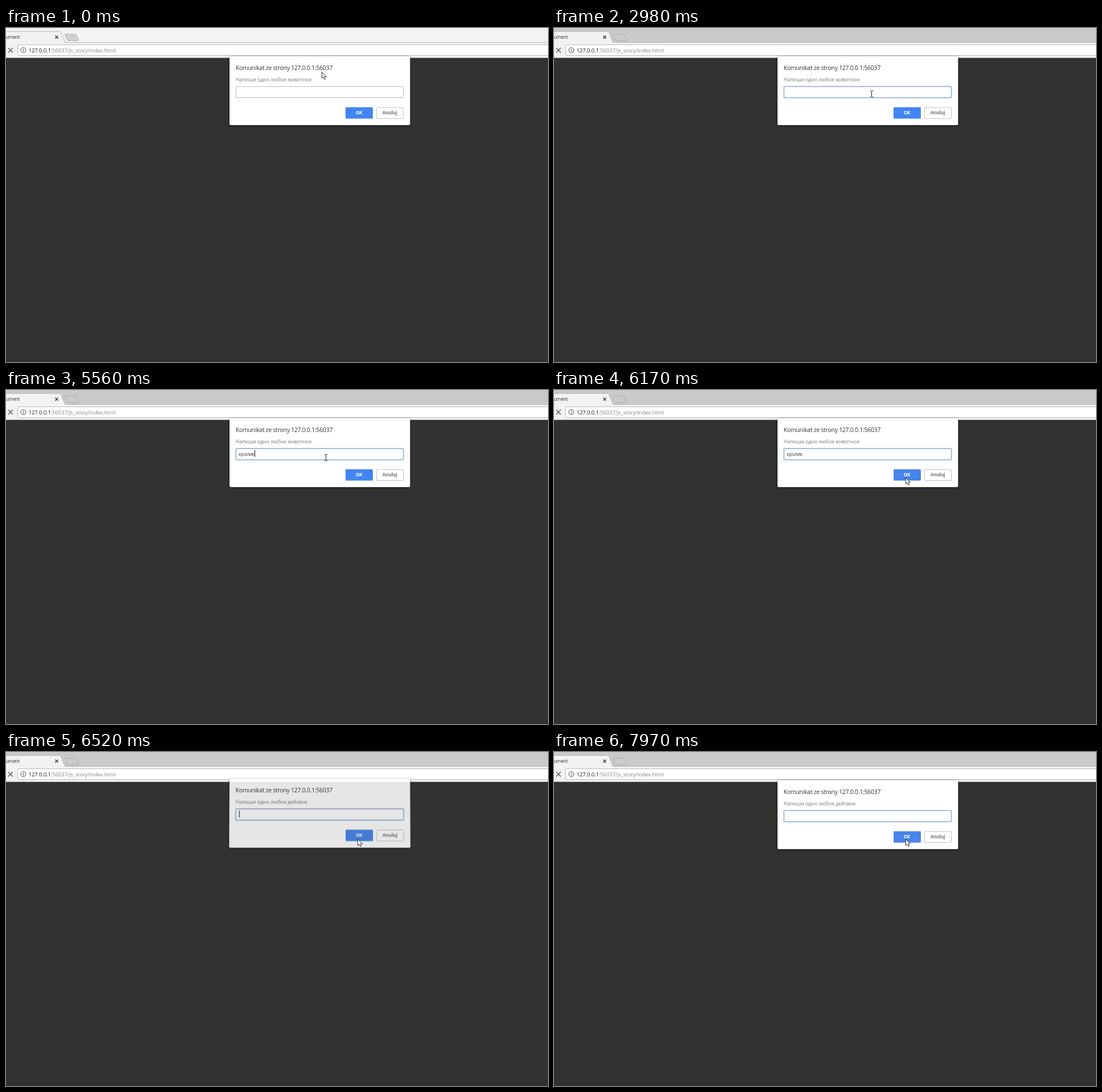
These frames come from a looping animation (953 by 588 pixels, 8000 ms). An HTML page:

```html
<!DOCTYPE html>
<html lang="pl">
<head>
<meta charset="utf-8">
<style>
  html, body { margin: 0; width: 100%; height: 100%; overflow: hidden; background: #323232; }
  svg { position: absolute; left: 0; top: 0; width: 953px; height: 588px; }
  text { font-family: "Open Sans", "Noto Sans", sans-serif; letter-spacing: -.022em; white-space: pre; }
  .dialog { left: 380px; width: 344px; height: 190px; transform-origin: 172px 50px; }
  .panel { fill: #fff; filter: drop-shadow(0 1px 2px rgba(0, 0, 0, .5)); }
  .button { font-size: 8.2px; font-weight: 700; text-anchor: middle; }
</style>
</head>
<body>
<svg viewBox="0 0 953 588">
  <rect id="strip" width="953" height="26"/>
  <path d="M104 25.5H953" stroke="#b4b4b4"/>
  <path id="newTab" d="M105 11H121.5Q123 11 123.7 12.5L127.5 20.5Q128 22.3 126 22.3H110Q108.3 22.3 107.5 20.5L103.8 12.5Q103.3 11 105 11Z" stroke="#a6a6a6" stroke-width=".9"/>
  <path d="M0 26V6H94.5Q96 6 96.8 7.8L103 23.5Q104 26 106 26H953V52.2H0Z" fill="#f2f2f2"/>
  <path d="M0 6H94.5Q96 6 96.8 7.8L103 23.5Q104 25.5 106 25.5" fill="none" stroke="#a8a8a8" stroke-width=".9"/>
  <path d="M0 52.5H953" stroke="#b3b3b3" stroke-width=".8"/>
  <rect x="20.5" y="29.5" width="950" height="19" rx="1.5" fill="#fff" stroke="#b9b9b9"/>
  <path d="M86.5 13.5L91.7 18.7M91.7 13.5L86.5 18.7" stroke="#333" stroke-width="1.3"/>
  <path d="M3.8 35L12 43.2M12 35L3.8 43.2" stroke="#555" stroke-width="1.3"/>
  <circle cx="30.5" cy="39" r="4.5" fill="none" stroke="#444"/>
  <path d="M30.5 38.3V41.6M30.5 36.3V37.4" stroke="#444" stroke-width="1.1"/>
  <text x="-.3" y="19.3" font-size="8.3" fill="#333">ument</text>
  <text x="39.7" y="42.6" font-size="9.7" fill="#888"><tspan fill="#222">127.0.0.1</tspan>:56037/js_story/index.html</text>
</svg>
<svg viewBox="0 0 953 588" style="z-index:1">
  <path id="arrow" d="M.5 .5V11.5L3 9.2L5 13.5L6.8 12.7L5 8.6H8.5Z" fill="#fff" stroke="#222" stroke-width=".9"/>
  <path id="beam" d="M-2.5 -5.5H-.8L.5 -4.5L1.8 -5.5H3.5M.5 -4.5V4.5M-2.5 5.5H-.8L.5 4.5L1.8 5.5H3.5" fill="none" stroke="#222"/>
</svg>
<script>
const LOOP = 8000, SWITCH = 6400;
const $ = id => document.getElementById(id);
const clamp = v => Math.max(0, Math.min(1, v));

// Cursor hotspot: time, x, y
const path = [
  [0, 555, 77], [139, 555, 77], [140, 555, 76], [630, 555, 76], [780, 555, 101], [900, 558, 117],
  [1349, 558, 117], [1350, 558, 116], [5149, 558, 116], [5150, 558, 115], [5500, 558, 115],
  [5860, 616, 162], [6040, 616, 162], [6130, 618, 154], [6299, 618, 154], [6300, 618, 153], [LOOP, 618, 153]
];
const keys = [[3450, "к"], [3680, "р"], [3740, "о"], [3970, "л"], [4270, "и"], [4490, "к"]];
const caretOn = [[410, 940], [1410, 1920], [2450, 2980], [3450, 5000], [5530, 6060], [SWITCH, 6880], [7410, 7970]];

function makeDialog(message) {
  document.body.insertAdjacentHTML("beforeend", `
    <svg class="dialog" viewBox="380 0 344 190">
      <path class="panel" d="M393 50H710.5V169Q710.5 171 708.5 171H395Q393 171 393 169Z"/>
      <text x="403.8" y="73.7" font-size="10.4" fill="#333">Komunikat ze strony 127.0.0.1:56037</text>
      <text x="403.8" y="93.7" font-size="9.1" fill="#7c7c7c">${message}</text>
      <rect class="field" x="404.3" y="103" width="294.5" height="19.7" rx="1.5" fill="#fff"/>
      <text class="typed" x="409.5" y="115.5" font-size="8.2" fill="#333"></text>
      <rect class="caret" y="106" width="1" height="12" fill="#111"/>
      <rect class="ok" x="597" y="139.5" width="48" height="20" rx="1.5"/>
      <text class="button" x="620.5" y="152.4" fill="#fff">OK</text>
      <rect x="651.3" y="140" width="47.5" height="19.3" rx="1.5" fill="#fff" stroke="#bdbdbd"/>
      <text class="button" x="674.7" y="152.4" fill="#757575">Anuluj</text>
    </svg>`);
  const root = document.body.lastElementChild;
  const part = name => root.querySelector("." + name);
  return { root, field: part("field"), typed: part("typed"), caret: part("caret"), ok: part("ok") };
}
const first = makeDialog("Напиши одно любое животное");
const second = makeDialog("Напиши одно любое дейсвие");

function drawDialog(d, { text, focused, caret, hover, lift, opacity }) {
  d.root.style.opacity = opacity;
  d.root.style.transform = lift
    ? `perspective(500px) translateY(${-lift}px) rotateX(${lift * .33}deg)` : "none";
  d.field.setAttribute("stroke", focused ? "#a5bce0" : "#b5b5b5");
  d.field.setAttribute("stroke-width", focused ? 2 : 1);
  d.typed.textContent = text;
  d.caret.style.display = caret ? "" : "none";
  d.caret.setAttribute("x", Math.round(410 + (text ? d.typed.getComputedTextLength() : 0)));
  d.ok.setAttribute("fill", hover ? "#4784ec" : "#4285f4");
}

function cursorAt(t) {
  const i = path.findIndex(p => p[0] > t), a = path[i - 1], b = path[i];
  const u = (t - a[0]) / (b[0] - a[0]);
  // one-millisecond segments are hard jumps
  const k = b[0] - a[0] > 1 ? u * u * (3 - 2 * u) : 0;
  return [1, 2].map(n => Math.round(a[n] + (b[n] - a[n]) * k));
}

function draw(t) {
  const [x, y] = cursorAt(t);
  const inField = x > 403 && x < 700 && y > 102 && y < 124;
  const hover = x > 596 && x < 646 && y > 139 && y < 160;
  for (const id of ["arrow", "beam"]) {
    $(id).setAttribute("transform", `translate(${x} ${y})`);
    $(id).style.display = inField === (id === "beam") ? "" : "none";
  }

  $("strip").setAttribute("fill", t < 410 ? "#f3f3f3" : t < 440 ? "#dedede" : "#cacaca");
  $("newTab").setAttribute("fill", t < 410 ? "#d0d0d0" : "#cbcbcb");

  const caret = caretOn.some(([from, to]) => t >= from && t < to);
  const leave = clamp((t - SWITCH) / 120);
  const remain = (1 - clamp((t - SWITCH - 30) / 150)) ** 1.5;
  drawDialog(first, {
    text: keys.filter(k => t >= k[0]).map(k => k[1]).join(""),
    focused: t >= 410 && t < SWITCH, caret: caret && t < SWITCH, hover,
    lift: 14 * leave, opacity: 1 - leave ** 3
  });
  drawDialog(second, {
    text: "", focused: true, caret, hover,
    lift: 12 * remain, opacity: 1 - remain ** 1.5
  });
}

function tick() {
  draw(performance.now() % LOOP);
  requestAnimationFrame(tick);
}
tick();
</script>
</body>
</html>
```
